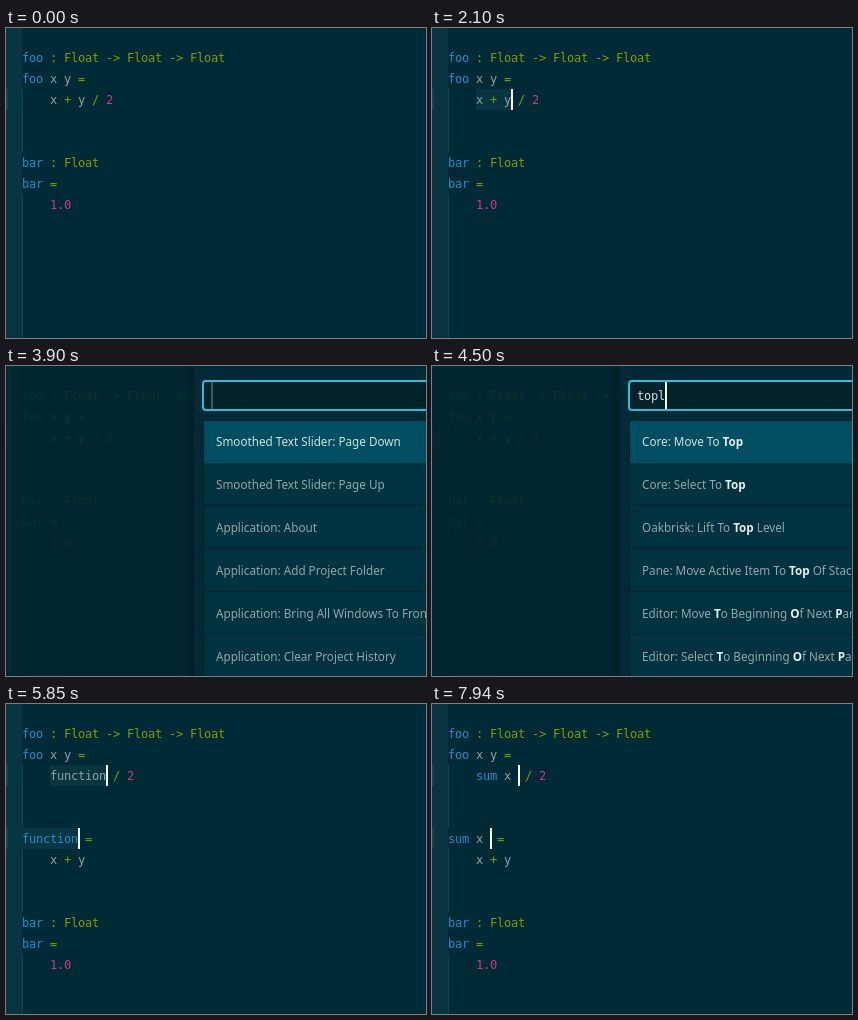
Animation, 420 px wide and 310 px high, one loop 8 s. Source, as an HTML page with a canvas:

```html
<!DOCTYPE html>
<html lang="en">
<head>
<meta charset="utf-8">
<title>Lift to top level</title>
<style>
  html, body { margin: 0; width: 100%; height: 100%; overflow: hidden; background: #002b36; }
  canvas { display: block; }
</style>
</head>
<body>
<canvas id="stage" width="420" height="310"></canvas>
<script>
const ctx = document.getElementById('stage').getContext('2d');
const WIDTH = 420, HEIGHT = 310, LOOP = 8000, TICK = 150;
const CELL = 7, LINE = 21, LEFT = 16, TOP = 19;
const MONO = '12px "DejaVu Sans Mono", monospace';
const UI = '11.7px "Noto Sans", sans-serif';
const COLORS = {
  base: '#002b36', gutter: '#073642', guide: '#0c4653', mark: '#0b4854', caret: '#fdf6e3',
  name: '#268bd2', symbol: '#859900', number: '#d33682', text: '#93a1a1'
};

// Asterisks enclose the matched letters.
const ALL_COMMANDS = [
  'Smoothed Text Slider: Page Down',
  'Smoothed Text Slider: Page Up',
  'Application: About',
  'Application: Add Project Folder',
  'Application: Bring All Windows To Front',
  'Application: Clear Project History'
];
const TOP_COMMANDS = [
  'Core: Move To *Top*',
  'Core: Select To *Top*',
  'Oakbrisk: Lift To *Top* Level',
  'Pane: Move Active Item To *Top* Of Stack',
  'Editor: Move *T*o Beginning *O*f Next *P*aragraph',
  'Editor: Select *T*o Beginning *O*f Next *P*aragraph'
];
const TOPL_COMMANDS = [
  'Oakbrisk: Lift To *Top L*evel',
  'Window: Move Active Item *To P*ane On *L*eft',
  'Window: Copy Active Item *To P*ane On *L*eft',
  'Ro*to*marinate *Pl*an: Activate',
  'Sal*t* Bo: C*o*py *Pl*us',
  'Edi*to*r: Du*pl*icate Lines'
];

const OPEN = 2550, CLOSE = 5850, RENAME = 7200;
const column = n => LEFT + n * CELL;
const row = n => TOP + n * LINE;
const clamp = v => Math.max(0, Math.min(1, v));

function fill(color, x, y, w, h) {
  ctx.fillStyle = color;
  ctx.fillRect(x, y, w, h);
}

// Fading caret: fully hidden at `dark`, fully shown 400 ms later.
function pulse(t, dark) {
  const phase = (((t - dark) % 800) + 800) % 800;
  return 1 - Math.abs(phase - 400) / 400;
}

function caret(x, y, h, alpha) {
  ctx.globalAlpha = alpha;
  fill(COLORS.caret, x, y, 2, h);
  ctx.globalAlpha = 1;
}

function monoText(text, x, y, color) {
  ctx.font = MONO;
  ctx.letterSpacing = '-0.22px';
  ctx.fillStyle = color;
  ctx.fillText(text, x, y);
  ctx.letterSpacing = '0px';
}

function tokenColor(token, index) {
  if (/^\d/.test(token)) return COLORS.number;
  if (/^[a-z]/.test(token)) return index === 0 || token === 'sum' ? COLORS.name : COLORS.text;
  return COLORS.symbol;
}

function drawCode(lines) {
  lines.forEach((line, i) => {
    for (const { 0: token, index } of line.matchAll(/\S+/g)) {
      monoText(token, column(index), row(i) + 15, tokenColor(token, index));
    }
  });
}

function drawGutter(lines, activeRows) {
  fill(COLORS.gutter, 0, 0, LEFT, HEIGHT);
  for (const i of activeRows) fill(COLORS.mark, 0, row(i), 2, LINE);
  for (let i = 0; row(i) < HEIGHT; i++) {
    if (!/^\S/.test(lines[i] || '')) fill(COLORS.guide, LEFT, row(i), 1, LINE);
  }
}

function drawEditor(t, tick) {
  const lifted = t >= CLOSE;
  const typed = t >= 7940 ? 6 : Math.floor((t - RENAME) / TICK) + 1;
  const name = t < RENAME ? 'function' : 'sum x '.slice(0, typed);
  const lines = ['foo : Float -> Float -> Float', 'foo x y ='].concat(
    lifted ? [`    ${name} / 2`, '', '', `${name} =`, '    x + y'] : ['    x + y / 2'],
    ['', '', 'bar : Float', 'bar =', '    1.0']
  );
  const carets = lifted ? [[4, 2], [0, 5]] : [[4, 2]];
  let length = 0, alpha = 1, selected = false;

  if (lifted) {
    length = name.length;
    selected = t < RENAME;
    if (selected && tick > 6000) alpha = pulse(tick, 6500);
  } else if (t < 1500) {
    alpha = pulse(Math.min(tick, 1200), 0);
  } else if (t < OPEN) {
    length = Math.min(5, Math.floor((t - 1500) / TICK) + 1);
    selected = true;
  } else {
    alpha = 0;
  }

  drawGutter(lines, carets.map(c => c[1]));
  if (selected) {
    for (const [c, r] of carets) fill(COLORS.gutter, column(c), row(r), length * CELL, LINE);
    if (length === 1) fill(COLORS.gutter, column(4), row(1), CELL, LINE);
  }
  drawCode(lines);
  for (const [c, r] of carets) caret(column(c + length), row(r), LINE, alpha);
}

function drawCommand(label, index) {
  const y = 54 + index * 43;
  const active = index === 0;
  fill(active ? '#004e61' : '#00333f', 198, y + (active ? 1 : 0), WIDTH - 198, active ? 42 : 42);
  let x = 210;
  label.split('*').forEach((part, i) => {
    const matched = i % 2 === 1;
    ctx.font = (matched ? 'bold ' : '') + UI;
    ctx.fillStyle = matched ? '#e6eeee' : active ? '#d3dfe0' : '#93a6a9';
    ctx.fillText(part, x, y + 26);
    x += ctx.measureText(part).width;
  });
}

function drawPalette(t, tick) {
  ctx.globalAlpha = 0.9 * clamp((tick - OPEN) / 700);
  fill('#002730', 0, 0, WIDTH, HEIGHT);
  ctx.globalAlpha = 1;

  const shadow = ctx.createLinearGradient(178, 0, 188, 0);
  shadow.addColorStop(0, 'rgba(0,20,26,0)');
  shadow.addColorStop(1, 'rgba(0,20,26,0.45)');
  fill(shadow, 178, 0, 10, HEIGHT);
  fill(COLORS.base, 188, 0, WIDTH - 188, HEIGHT);

  ctx.beginPath();
  ctx.roundRect(197, 15, 260, 29, 3);
  ctx.fillStyle = '#04222a';
  ctx.fill();
  ctx.strokeStyle = '#35b9d6';
  ctx.lineWidth = 2;
  ctx.stroke();

  const query = t < 4200 ? '' : t < 4350 ? 't' : t < 4500 ? 'top' : 'topl';
  monoText(query, 205, 34, '#d5dddd');
  let alpha = 1;
  if (t < 4200) alpha = pulse(Math.min(tick, 3900), 3000);
  else if (t >= 5100) alpha = pulse(tick, 5350);
  caret(205 + query.length * CELL, 16, 27, alpha);

  fill('#001e26', 197, 54, WIDTH - 197, HEIGHT - 54);
  const commands = t < 4350 ? ALL_COMMANDS : t < 4650 ? TOP_COMMANDS : TOPL_COMMANDS;
  commands.forEach(drawCommand);
}

function draw(t) {
  const tick = Math.floor(t / TICK) * TICK;
  fill(COLORS.base, 0, 0, WIDTH, HEIGHT);
  drawEditor(t, tick);
  if (t >= OPEN && t < CLOSE) drawPalette(t, tick);
}

const start = performance.now();
function loop() {
  draw((performance.now() - start) % LOOP);
  requestAnimationFrame(loop);
}
loop();
</script>
</body>
</html>
```
